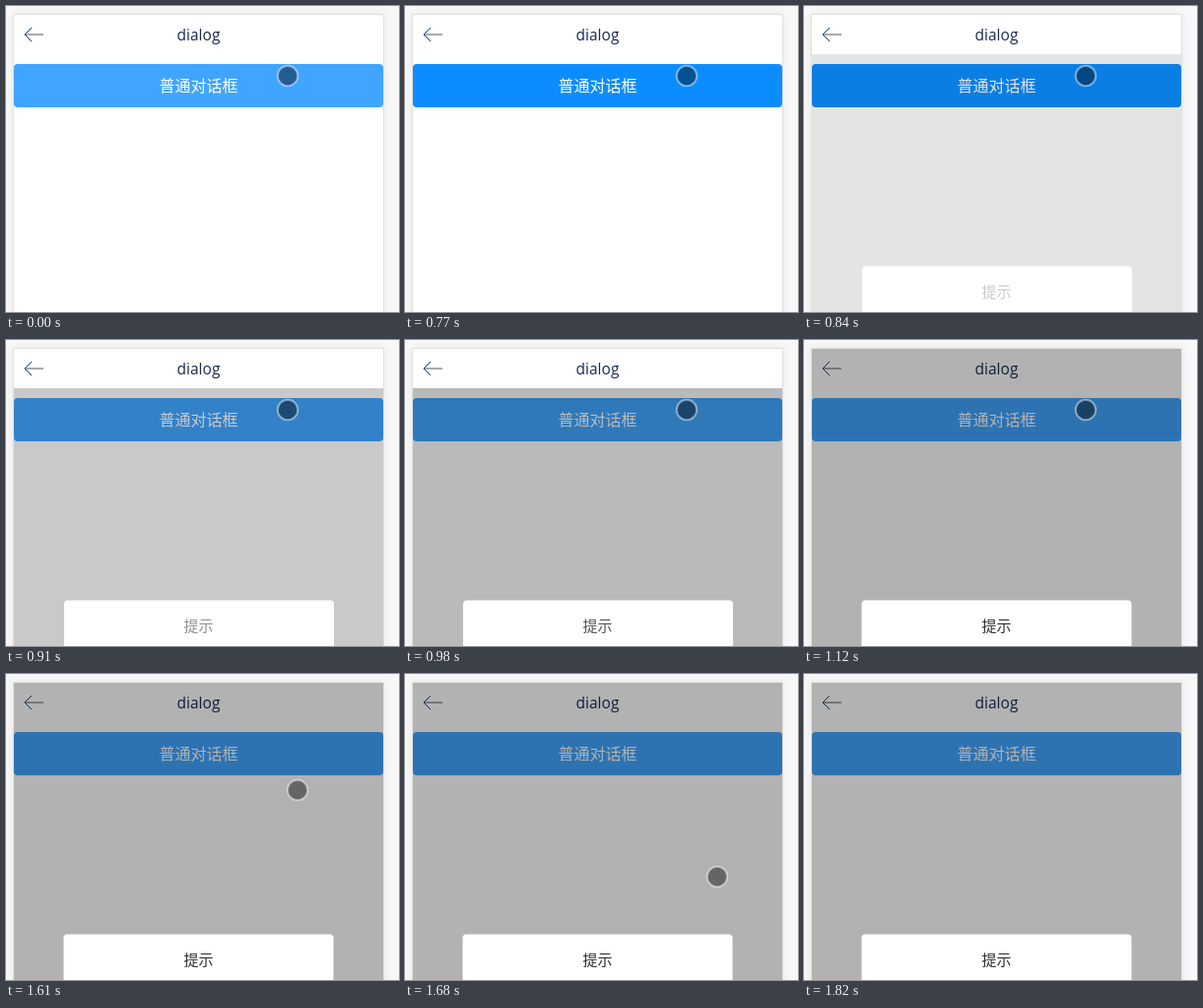
An HTML page for the animation above (2240 ms loop, 399 by 311 pixels).

```html
<!DOCTYPE html>
<html lang="zh-CN">
<head>
<meta charset="utf-8">
<style>
  html, body { margin: 0; width: 100%; height: 100%; overflow: hidden; background: #f8f8f8; }
  svg { display: block; width: 399px; height: 311px; }
  text { text-anchor: middle; font-family: "Noto Sans CJK SC", "Noto Sans CJK", sans-serif; }
  #header text { font: 15.5px "Open Sans", "Noto Sans", sans-serif; }
  #page { filter: drop-shadow(0 0 4px rgba(0, 0, 0, .07)); }
</style>
</head>
<body>
<svg viewBox="0 0 399 311">
  <rect id="page" x="7.5" y="8.5" width="376" height="330" fill="#fff" stroke="#e0e0e0"/>
  <rect id="button" x="8" y="59" width="375" height="44" rx="4"/>
  <text x="195.5" y="87" font-size="16" fill="#fff">普通对话框</text>
  <rect id="mask" x="8" y="49" width="375" height="262"/>
  <g id="header">
    <rect x="8" y="9" width="375" height="40" fill="#fff"/>
    <path d="M19 29H38" stroke="#555" fill="none"/>
    <path d="M26 22L19 29L26 36" stroke="#123a78" fill="none"/>
    <text x="195.5" y="35" fill="#1a2b50">dialog</text>
    <rect id="headerMask" x="8" y="9" width="375" height="40" opacity=".3"/>
  </g>
  <g id="dialog">
    <rect id="panel" y="264.5" width="274" height="60" rx="4" fill="#fff"/>
    <text id="title" x="195.5" y="295.5" font-size="15" fill="#303030">提示</text>
  </g>
  <circle id="touch" r="10.2" fill="#000" fill-opacity=".43" stroke="#fff" stroke-opacity=".45" stroke-width="2"/>
</svg>
<script>
  const LOOP = 2240, TICK = 70;
  const PRESS = 11, RELEASE = 13, COVERED = 16, MOVE = 22;
  const maskFade = [0, .106, .21, .27, .3];
  const titleFade = [0, .25, .52, .82, 1];
  const touchPath = [[286, 71], [296, 118], [317, 206], [341, 290]];

  const el = id => document.getElementById(id);
  const set = (id, attrs) => {
    for (const name in attrs) el(id).setAttribute(name, attrs[name]);
  };
  const at = (list, i) => list[Math.max(0, Math.min(list.length - 1, i))];

  function draw(time) {
    const tick = Math.floor((time % LOOP) / TICK);
    const pressed = tick >= PRESS && tick < RELEASE;
    const covered = tick >= COVERED;
    const [cx, cy] = at(touchPath, tick - MOVE);

    set('button', { fill: pressed ? '#0c8dff' : '#40a5ff' });
    set('mask', { opacity: at(maskFade, tick - PRESS) });
    set('headerMask', { visibility: covered ? 'visible' : 'hidden' });
    set('dialog', { visibility: tick > PRESS ? 'visible' : 'hidden' });
    set('panel', { x: covered ? 58.5 : 59 });
    set('title', { opacity: at(titleFade, tick - PRESS) });
    set('touch', { cx, cy, visibility: tick < MOVE + touchPath.length ? 'visible' : 'hidden' });
  }

  const start = performance.now();
  (function frame() {
    draw(performance.now() - start);
    requestAnimationFrame(frame);
  })();
</script>
</body>
</html>
```
